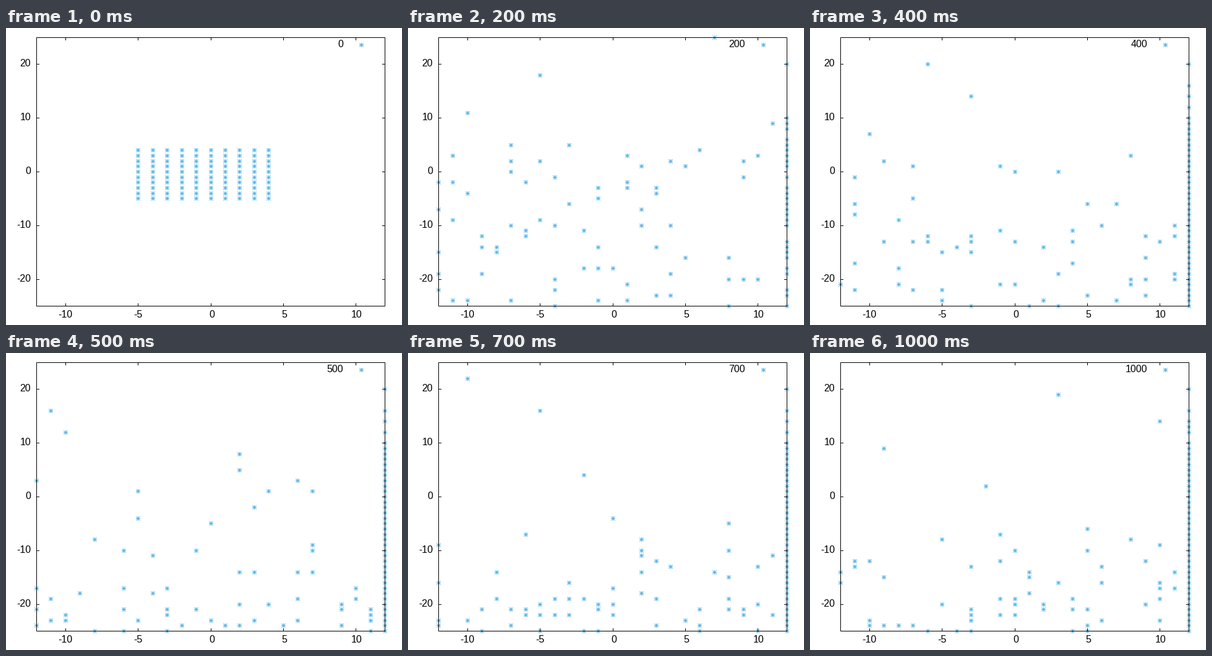
Recreate the animation shown at these times as a matplotlib script. Size 640 px wide and 480 px high, loop 1.1 s.

```python
import random

import matplotlib.pyplot as plt
import numpy as np
from matplotlib.animation import FuncAnimation

W, H, DPI = 640, 480, 100
LEFT, RIGHT, TOP, BOTTOM = 49, 612, 15, 449
XMAX, YMAX = 12, 25
FRAMES, STEPS = 11, 100
PX = 72 / DPI  # one pixel in points
BLUE = "#56b4e9"

plt.rcParams["font.family"] = "Liberation Sans"
plt.rcParams["font.size"] = 16 * PX
plt.rcParams["path.simplify"] = False


def to_px(x, y):
    """Data coordinates to the centre of the nearest pixel."""
    px = LEFT + (RIGHT - LEFT) * (np.asarray(x) + XMAX) / (2 * XMAX)
    py = BOTTOM - (BOTTOM - TOP) * (np.asarray(y) + YMAX) / (2 * YMAX)
    return np.floor(px + 0.5) + 0.5, np.floor(py + 0.5) + 0.5


def join(segments):
    """Separate segments as one broken line."""
    gap = (np.nan, np.nan)
    pts = np.array([p for a, b in segments for p in (a, b, gap)])
    return pts[:, 0], pts[:, 1]


def stars(px, py):
    arms = ((3.5, 0), (0, 3.5), (3.1, 3.1), (3.1, -3.1))
    return join([((x - dx, y - dy), (x + dx, y + dy))
                 for x, y in zip(px, py) for dx, dy in arms])


def walk():
    """Falling random walkers: one per site, caught by the right wall."""
    rng = random.Random(7)
    cells = [(x, y) for x in range(-5, 5) for y in range(-5, 5)]
    taken = set(cells)
    history = [list(cells)]
    for _ in range(FRAMES - 1):
        for _ in range(STEPS):
            for i, (x, y) in enumerate(cells):
                if x == XMAX:
                    continue
                new = (x + rng.choice((-1, 1)),
                       y + (-1 if rng.random() < 0.525 else 1))
                if new in taken or new[0] < -XMAX or abs(new[1]) > YMAX:
                    continue
                taken.remove((x, y))
                taken.add(new)
                cells[i] = new
        history.append(list(cells))
    return history


fig = plt.figure(figsize=(W / DPI, H / DPI), dpi=DPI, facecolor="white")
ax = fig.add_axes([0, 0, 1, 1])
ax.set_xlim(0, W)
ax.set_ylim(H, 0)
ax.axis("off")


def stroke(xy, color, z):
    return ax.plot(*xy, color=color, lw=PX, solid_capstyle="butt",
                   snap=False, zorder=z)[0]


ax.add_patch(plt.Rectangle((LEFT + 0.5, TOP + 0.5), RIGHT - LEFT, BOTTOM - TOP,
                           fill=False, ec="black", lw=PX, snap=False, zorder=3))

ticks = []
for v in range(-10, 11, 5):
    x = float(to_px(v, 0)[0])
    ticks += [((x, TOP), (x, TOP + 5)), ((x, BOTTOM - 4), (x, BOTTOM + 1))]
    ax.text(x + (1 if v >= 0 else -0.5), 468, str(v), ha="center", va="baseline")
for v in range(-20, 21, 10):
    y = float(to_px(0, v)[1])
    ticks += [((LEFT, y), (LEFT + 5, y)), ((RIGHT - 4, y), (RIGHT + 1, y))]
    ax.text(40, y + 3.5, str(v), ha="right", va="baseline")
stroke(join(ticks), "black", 3)

stroke(stars([574.5], [27.5]), BLUE, 2)
label = ax.text(545, 31, "0", ha="right", va="baseline")

history = walk()
points = stroke(stars(*to_px(*zip(*history[0]))), BLUE, 2)


def draw(i):
    points.set_data(*stars(*to_px(*zip(*history[i]))))
    label.set_text(str(i * STEPS))
    return points, label


anim = FuncAnimation(fig, draw, frames=FRAMES, interval=100, repeat=True,
                     repeat_delay=0)
plt.show()
```
